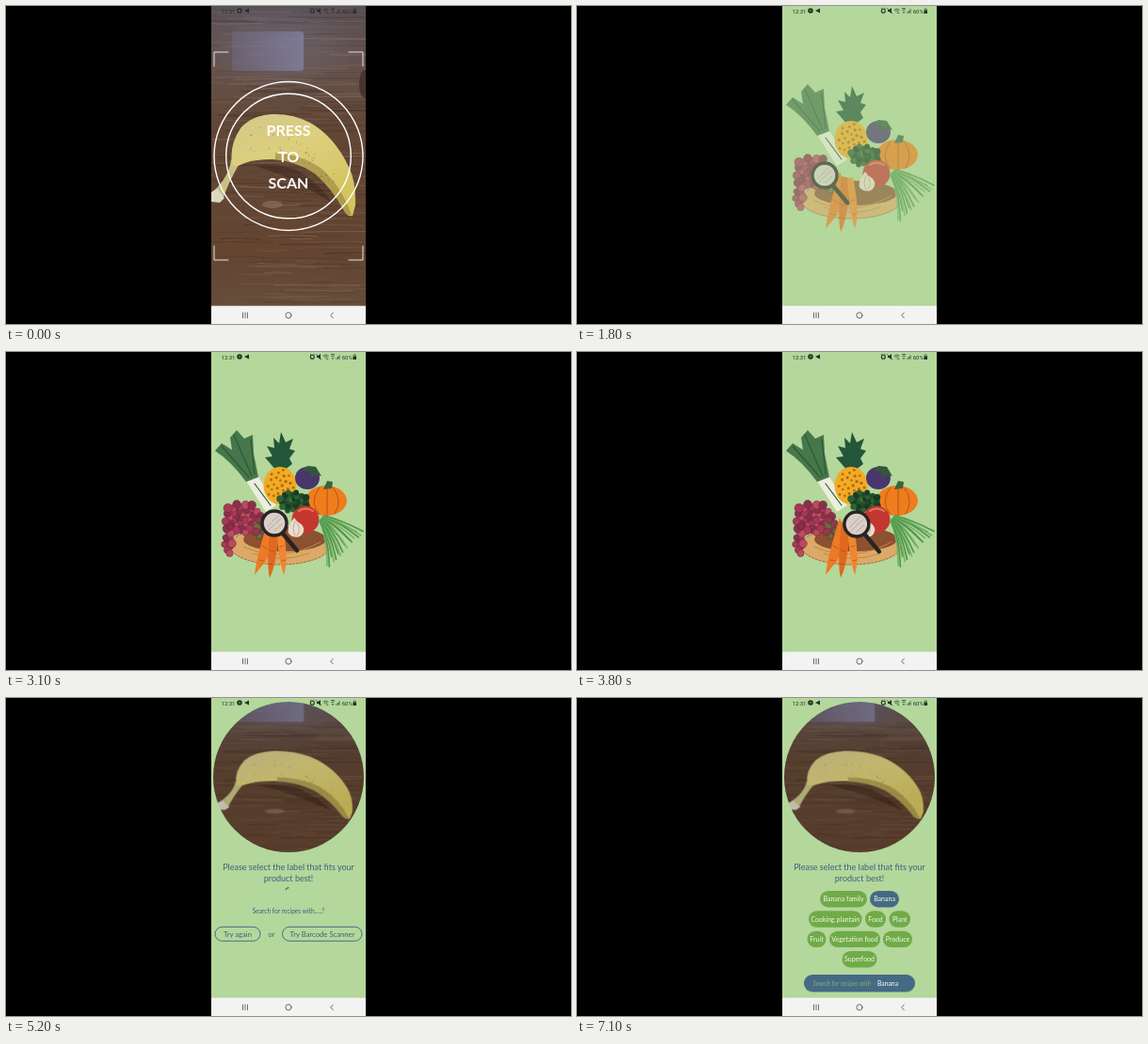
Animation of 600x338 px, one loop 7200 ms. Source, as an HTML page:

```html
<!DOCTYPE html>
<html lang="en">
<head>
<meta charset="utf-8">
<title>Fruit scanner</title>
<style>
html, body { margin: 0; width: 100%; height: 100%; overflow: hidden; background: #000; }
svg { display: block; width: 600px; height: 338px; }
text { font-family: Lato, sans-serif; text-anchor: middle; }
.line { fill: none; stroke-linecap: round; stroke-linejoin: round; }
#result { filter: brightness(.88); }
</style>
</head>
<body>
<svg viewBox="0 0 600 338">
  <defs>
    <clipPath id="screen"><rect x="218" width="164" height="338"/></clipPath>
    <clipPath id="round"><circle cx="300" cy="84" r="80"/></clipPath>
    <linearGradient id="wood" x2="0" y2="1">
      <stop offset="0" stop-color="#574e55"/>
      <stop offset=".2" stop-color="#64524d"/>
      <stop offset=".38" stop-color="#624736"/>
      <stop offset=".75" stop-color="#634531"/>
      <stop offset="1" stop-color="#67503f"/>
    </linearGradient>
    <linearGradient id="glare">
      <stop offset="0" stop-color="#77769a" stop-opacity=".3"/>
      <stop offset="1" stop-color="#8583a4" stop-opacity=".75"/>
    </linearGradient>
    <radialGradient id="sheen">
      <stop offset="0" stop-color="#7f7d99" stop-opacity=".4"/>
      <stop offset="1" stop-color="#7f7d99" stop-opacity="0"/>
    </radialGradient>
    <linearGradient id="peel" x2=".5" y2="1">
      <stop offset="0" stop-color="#d3c78c"/>
      <stop offset=".45" stop-color="#dccf7c"/>
      <stop offset="1" stop-color="#d3c45e"/>
    </linearGradient>
    <g id="photo">
      <rect x="200" y="-10" width="200" height="360" fill="url(#wood)"/>
      <g id="grain"/>
      <ellipse cx="290" cy="40" rx="85" ry="50" fill="url(#sheen)"/>
      <rect x="240" y="27" width="76" height="42" rx="3" fill="url(#glare)"/>
      <ellipse cx="381" cy="83" rx="6" ry="15" fill="#35231f" opacity=".6"/>
      <ellipse cx="283" cy="211" rx="11" ry="4" fill="#9b806a" opacity=".5"/>
      <path d="M262 169Q288 166 312 176Q334 190 348 211Q326 196 300 183Q278 174 262 169Z" fill="#2f1c14" opacity=".4"/>
      <path d="M239 163Q237 182 219 198L220 207L230 206Q236 188 247 169Z" fill="#c6c183"/>
      <path d="M218 198L224 194L232 204L227 209L218 208Z" fill="#dcd7c2"/>
      <path d="M240 168Q237 148 249 130Q261 116 282 115Q304 114 323 124Q349 139 364 171Q372 187 371 212L368 223Q363 225 358 216Q347 195 328 178Q307 164 283 163Q261 163 251 168Q244 172 240 168Z" fill="url(#peel)"/>
      <path d="M286 157Q312 157 334 172Q356 191 367 222Q363 225 358 216Q347 195 328 178Q309 165 286 163Z" fill="#8c7636" opacity=".5"/>
      <g id="spots" fill="#75602f" opacity=".6"/>
    </g>
  </defs>
  <rect width="600" height="338"/>
  <g clip-path="url(#screen)">
    <g id="camera">
      <use id="view" href="#photo"/>
      <g id="frame" class="line" stroke="#e8e4e2">
        <path d="M221 64V49H236M364 49H379V64M221 255V270H236M364 270H379V255"/>
      </g>
      <g id="press" fill="#fff" font-size="16" font-weight="700">
        <g fill="none" stroke="#fff" stroke-width="1.4">
          <circle id="outer" cx="300" cy="159.5" r="79"/>
          <circle cx="300" cy="159.5" r="66.3"/>
        </g>
        <text x="300" y="138">PRESS</text>
        <text x="300" y="166">TO</text>
        <text x="300" y="194">SCAN</text>
      </g>
    </g>

    <g id="app">
      <rect x="217" width="166" height="338" fill="#b4d79c"/>
      <g id="loader">
        <ellipse cx="291" cy="206" rx="53" ry="20" fill="#dca968" stroke="#9c6a35" stroke-dasharray="3 1"/>
        <ellipse cx="296" cy="199" rx="44" ry="13" fill="#8b5130"/>
        <path class="line" d="M252 207Q292 225 334 202M262 214Q292 225 322 214" stroke="#c78643"/>
        <path d="M255 137L267 131L287 163L276 170Z" fill="#eceedd"/>
        <path d="M255 138Q239 116 222 105L229 97L240 104L238 91L245 83L253 92L262 88L263 108L268 133Z" fill="#46774a"/>
        <path class="line" d="M229 100L258 133M242 88L261 132M260 93L264 130M264 140L281 163" stroke="#2c5934" stroke-width="1.2"/>
        <path d="M287 126L275 112L283 111L277 100L285 102L284 91L290 97L292 85L297 96L305 92L301 103L307 105L301 113L304 119L295 126Z" fill="#23563a"/>
        <ellipse cx="291" cy="142" rx="17.5" ry="20" fill="#f2ab22"/>
        <g id="scales" fill="#ad681b"/>
        <ellipse cx="320" cy="134" rx="13" ry="12" fill="#49376c"/>
        <path d="M315 126L320 121L329 122L335 132L329 130L325 134L323 127Z" fill="#315938"/>
        <ellipse cx="340" cy="158" rx="22" ry="16" fill="#ef7d1c"/>
        <path class="line" d="M333 144Q321 159 333 173M341 143V174M348 145Q358 158 349 172" stroke="#b95519"/>
        <path d="M337 146L341 137L347 138L346 145Z" fill="#39643c"/>
        <g id="herbs" fill="#214b29"/>
        <circle cx="318" cy="178" r="14.5" fill="#c43731"/>
        <path class="line" d="M311 169Q318 164 326 169" stroke="#e7775c" stroke-width="2"/>
        <path d="M306 176L309 180Q318 185 316 191Q313 199 304 196Q297 193 301 184Z" fill="#ecdccb"/>
        <path class="line" d="M307 180Q303 188 307 195M309 182Q314 188 309 195" stroke="#b88c86" stroke-width=".7"/>
        <g id="grapes" stroke="#682037" stroke-width=".5"/>
        <g id="chives" class="line" stroke-width="1.7"/>
        <path d="M279 176L287 195L276 222L264 237Q266 218 279 176Z" fill="#ed7a25"/>
        <path d="M281 181L290 183Q288 225 280 240Q276 225 281 181Z" fill="#df691f"/>
        <path d="M287 184L293 182Q301 219 295 237Q289 220 287 184Z" fill="#f0862e"/>
        <path class="line" d="M272 206L277 209M269 221L274 222M280 211L285 212M279 225L283 226M291 207L295 206M293 222L297 221" stroke="#aa4d1c" stroke-width=".7"/>
        <g id="lens">
          <path class="line" d="M9 11L24 29" stroke="#282423" stroke-width="4.5"/>
          <circle r="13" fill="#d9cfc9" stroke="#282423" stroke-width="3.5"/>
          <path class="line" d="M-7 3L4 -8M-6 7L7 -5M0 8L8 1" stroke="#b9a7a4"/>
        </g>
      </g>

      <g id="page" fill="#3d617e">
        <g id="result" clip-path="url(#round)">
          <use href="#photo" transform="matrix(.94 0 0 .667 19.1 -20.4)"/>
        </g>
        <g font-size="9">
          <text x="300" y="183">Please select the label that fits your</text>
          <text x="300" y="194.5">product best!</text>
        </g>
        <path id="spin" class="line" stroke="#3d617e" stroke-width="1.1"/>
        <g id="retry">
          <text x="300" y="229" font-size="6.6">Search for recipes with.....?</text>
          <g fill="none" stroke="#3d617e" stroke-width=".9">
            <rect x="222" y="243.3" width="48" height="15" rx="7.5"/>
            <rect x="293.5" y="243.3" width="84.5" height="15" rx="7.5"/>
          </g>
          <g font-size="7.7">
            <text x="246" y="253.5">Try again</text>
            <text x="282" y="253.5">or</text>
            <text x="336" y="253.5">Try Barcode Scanner</text>
          </g>
        </g>
        <g id="chips" font-size="7"/>
        <g id="search">
          <rect x="241" y="295" width="118" height="18" rx="9" fill="#2e4b5c" opacity=".35"/>
          <rect x="241" y="294" width="118" height="18" rx="9" fill="#456a84"/>
          <text x="281.5" y="306" font-size="6.6" font-style="italic" fill="#83aa70">Search for recipes with</text>
          <text x="330" y="306" font-size="6.8" fill="#fff">Banana</text>
        </g>
      </g>
    </g>

    <g id="status" fill="#25302a">
      <text x="236" y="7.6" font-size="6" style="font-family:Roboto,sans-serif">12:31</text>
      <circle cx="248" cy="5" r="2.8"/>
      <path d="M246.8 5H249.2" stroke="#b4d79c" stroke-width=".7"/>
      <path d="M253 5L258 2.5V7.5Z"/>
      <circle cx="325.3" cy="5.2" r="2" fill="none" stroke="#25302a" stroke-width="1.1"/>
      <path d="M323 3L324.3 2M326.3 2L327.6 3" stroke="#25302a" stroke-width=".8"/>
      <path d="M330 4H331.5L334 2V8L331.5 6H330Z"/>
      <path class="line" d="M329.5 2.5L335 7.8M337 4Q339.7 1.6 342.3 4M338.2 5.4Q339.7 4 341.2 5.4M340 7L342 7.6" stroke="#25302a" stroke-width=".7"/>
      <path d="M345 2.5H349M345.3 4.3H348.7M346 6L347 7.5L348 6" fill="none" stroke="#25302a" stroke-width=".7"/>
      <path d="M350.8 7.7V6.4M352.4 7.7V5M354 7.7V3.4" stroke="#25302a" stroke-width=".8"/>
      <text x="362.3" y="7.6" font-size="6" style="font-family:Roboto,sans-serif">60%</text>
      <path d="M368.5 4.4H372V8H368.5Z"/>
      <path d="M369.2 4.5V3.3Q370.2 1.7 371.3 3.3V4.5" fill="none" stroke="#25302a" stroke-width=".7"/>
    </g>
    <rect x="217" y="318.7" width="166" height="20" fill="#f3f3f3"/>
    <g class="line" stroke="#5c5c5c" stroke-width=".9">
      <path d="M251.5 326V331.5M254 326V331.5M256.5 326V331.5M347.3 326L344.7 328.8L347.3 331.6"/>
      <circle cx="300" cy="328.8" r="3.1"/>
    </g>
  </g>
</svg>
<script>
const LOOP = 7200;
const CUT = { app: 1500, page: 4200, photo: 4900, chips: 5700, pick: 6500 };
const $ = id => document.getElementById(id);
const clamp = v => Math.max(0, Math.min(1, v));
const ramp = (t, a, b) => clamp((t - a) / (b - a));
const show = (id, on) => { $(id).style.display = on ? "" : "none"; };

let seed = 17;
const rnd = (a = 0, b = 1) => {
  seed = (seed * 16807) % 2147483647;
  return a + (b - a) * seed / 2147483647;
};

function add(parent, tag, attrs, label = "") {
  const el = document.createElementNS("http://www.w3.org/2000/svg", tag);
  for (const key in attrs) el.setAttribute(key, attrs[key]);
  el.textContent = label;
  $(parent).append(el);
  return el;
}

function dots(parent, count, cx, cy, rx, ry, size, colors) {
  for (let i = 0; i < count; i++) {
    const a = i * 2.4, d = Math.sqrt((i + .5) / count);
    const attrs = { cx: cx + rx * d * Math.cos(a), cy: cy + ry * d * Math.sin(a), r: size * rnd(.8, 1.2) };
    if (colors) attrs.fill = colors[i % colors.length];
    add(parent, "circle", attrs);
  }
}

// Long faint streaks along the table
for (let i = 0; i < 260; i++) {
  const x = rnd(195, 350), y = rnd(-8, 345), w = rnd(20, 100);
  add("grain", "path", {
    d: `M${x} ${y}q${w / 2} ${rnd(-2, 2)} ${w} ${rnd(-1, 1)}`,
    fill: "none", stroke: rnd() < .55 ? "#2d1b13" : "#a98a75",
    "stroke-width": rnd(.4, 1.4), opacity: rnd(.1, .32)
  });
}
for (let i = 0; i < 70; i++) {
  const u = rnd(), x = 255 + u * 95;
  add("spots", "circle", { cx: x, cy: 141 + 50 * u * u + rnd(-14, 14), r: rnd(.3, .75) });
}

dots("scales", 24, 291, 142, 15, 17, 1.4);
dots("herbs", 30, 305, 159, 16, 11, 3.2, ["#214b29", "#2e6135", "#183c23"]);
const berry = ["#a63955", "#88304c", "#bd4960"];
dots("grapes", 36, 251, 176, 20, 17, 4.2, berry);
dots("grapes", 12, 236, 199, 5, 16, 3.6, berry);
dots("grapes", 10, 270, 187, 5, 11, 3.5, ["#66733b", "#8b3c48"]);
for (let i = 0; i < 17; i++) {
  const u = i / 16;
  add("chives", "path", {
    d: `M${333 + u * 5} ${180 - u * 6}Q${341 + u * 14} ${196 - u * 18} ${341 + u * 38} ${225 - u * 38 + rnd(-4, 7)}`,
    stroke: i % 3 ? "#4f9650" : "#79b563"
  });
}

const chips = [
  [258, 205, 50, "Banana family"], [311, 205, 31, "Banana"],
  [246, 226.3, 56.5, "Cooking plantain"], [306, 226.3, 22, "Food"], [331.5, 226.3, 22.5, "Plant"],
  [244.5, 247.7, 20, "Fruit"], [268, 247.7, 54, "Vegetation food"], [325, 247.7, 31, "Produce"],
  [281.5, 269, 37, "Superfood"]
].map(([x, y, width, label]) => {
  const box = add("chips", "rect", { x, y, width, height: 17.4, rx: 8.7, fill: "#70ab47" });
  add("chips", "text", { x: x + width / 2, y: y + 11.3, fill: "#f4f8ef" }, label);
  return box;
});

function spinner(t) {
  const dt = t - 4500;
  const mid = 167 + dt * 430 / 700;
  const span = 160 + 90 * Math.cos(2 * Math.PI * dt / 1333);
  const point = deg => {
    const a = deg * Math.PI / 180;
    return `${300 + 3.2 * Math.cos(a)} ${205 + 3.2 * Math.sin(a)}`;
  };
  $("spin").setAttribute("d",
    `M${point(mid - span / 2)}A3.2 3.2 0 ${span > 180 ? 1 : 0} 1 ${point(mid + span / 2)}`);
}

function draw(t) {
  const labelled = t >= CUT.chips, picked = t >= CUT.pick;
  show("camera", t < CUT.app);
  show("app", t >= CUT.app);
  show("loader", t < CUT.page);
  show("page", t >= CUT.page);
  show("result", t >= CUT.photo);
  show("spin", !labelled);
  show("chips", labelled);
  show("search", picked);
  show("retry", !picked);

  $("view").setAttribute("transform", `translate(0 ${3 * ramp(t, 0, 700)})`);
  $("frame").setAttribute("opacity", 1 - ramp(t, 300, 600));
  $("press").setAttribute("opacity", 1 - ramp(t, 300, 755));
  $("outer").setAttribute("r", 79 + 2 * ramp(t, 300, 700));

  $("loader").setAttribute("opacity", ramp(t, 1450, 2030));
  const u = (t - 1800) / 1300;
  $("lens").setAttribute("transform", `translate(${263 + 22 * u} ${180 + 2 * u})`);

  $("retry").setAttribute("transform", `translate(0 ${labelled ? 76 : 0})`);
  chips[1].setAttribute("fill", picked ? "#456a84" : "#70ab47");
  spinner(t);
}

const start = performance.now();
function tick() {
  draw((performance.now() - start) % LOOP);
  requestAnimationFrame(tick);
}
tick();
</script>
</body>
</html>
```
